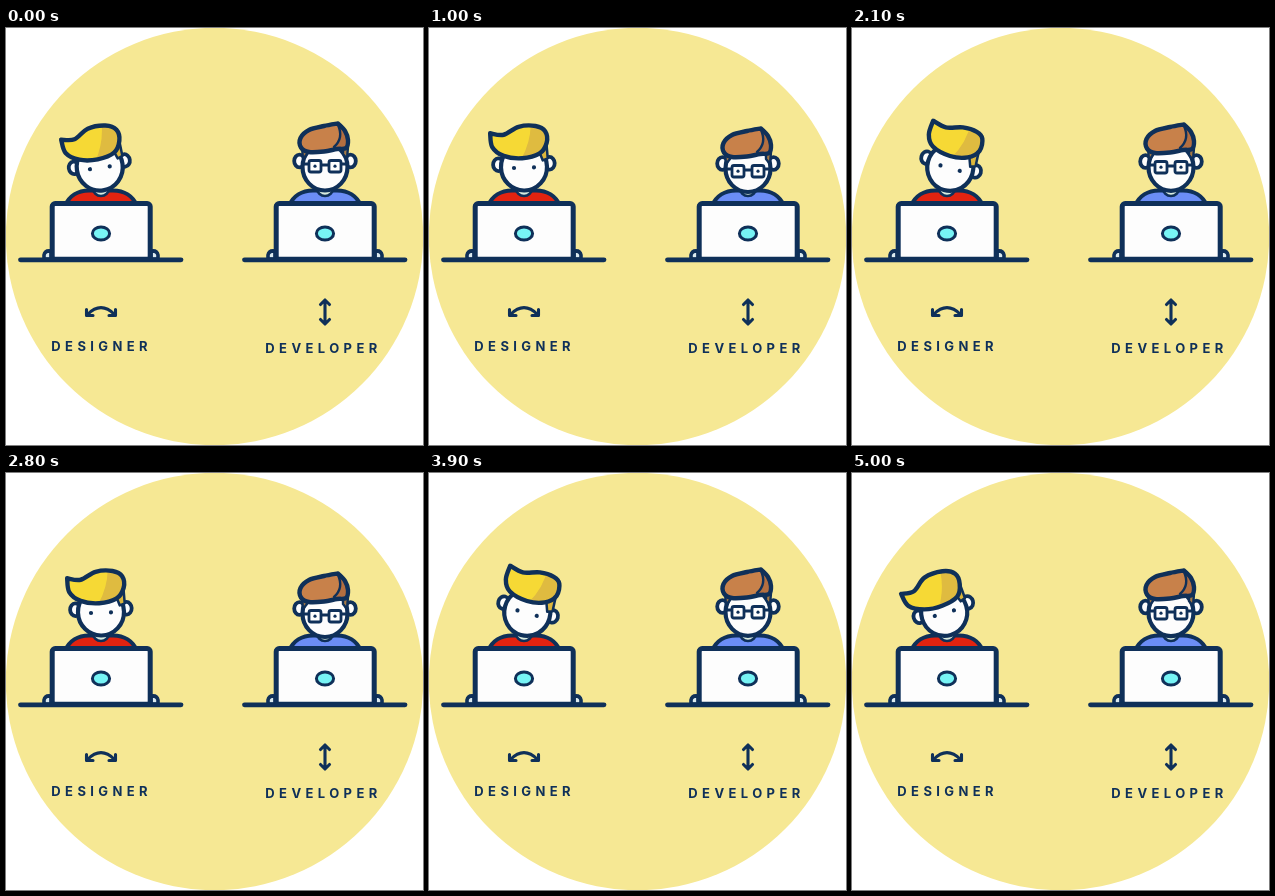
These frames come from a looping animation (417 by 417 pixels, 5.1 s). An HTML page with a canvas:

```html
<!DOCTYPE html>
<html lang="en">
<head>
<meta charset="utf-8">
<title>Designer and developer</title>
<style>
  html, body { margin: 0; width: 100%; height: 100%; overflow: hidden; background: #fff; }
  canvas { display: block; width: 417px; height: 417px; }
</style>
</head>
<body>
<canvas id="stage" width="417" height="417"></canvas>
<script>
const ctx = document.getElementById('stage').getContext('2d');
const NAVY = '#0f3059', WHITE = '#fdfdfd', SAND = '#f6e894';
const LOOP = 5100, STEP = 100;
const DESK_GAP = 224;

// Hair outlines in head space, leaning left and leaning right; both start at the tip.
const HAIR_LEFT = [[-36, -41], [-23, -40], [-9, -50], [10, -51], [21.5, -45], [23, -34],
  [17, -22.5], [0, -18], [-18, -19.5], [-32.5, -27.5]];
const HAIR_RIGHT = [[-29, -51.5], [-15, -48.5], [1.5, -53], [16, -52.5], [23, -47.5], [23.7, -35],
  [14, -25.5], [-3.5, -22], [-22.5, -26.5], [-29.5, -37]];
const QUIFF = [[332, 95.5], [318, 98], [303, 102], [294.5, 110], [295, 119.5], [303, 124],
  [318, 123.5], [331, 121], [340, 120], [342, 112], [339, 103]];
const NOD = [0, 1.5, 2, 1, 5, 7];

function paint(fill, width = 4) {
  if (fill) { ctx.fillStyle = fill; ctx.fill(); }
  if (width) { ctx.strokeStyle = NAVY; ctx.lineWidth = width; ctx.stroke(); }
}

function oval(x, y, rx, ry, fill, width) {
  ctx.beginPath();
  ctx.ellipse(x, y, rx, ry, 0, 0, Math.PI * 2);
  paint(fill, width);
}

function box(x, y, w, h, r, fill, width) {
  ctx.beginPath();
  ctx.roundRect(x, y, w, h, r);
  paint(fill, width);
}

function shape(path, fill, width) {
  const p = new Path2D(path);
  if (fill) { ctx.fillStyle = fill; ctx.fill(p); }
  if (width) { ctx.strokeStyle = NAVY; ctx.lineWidth = width; ctx.stroke(p); }
}

// Smooth loop through the points with a sharp corner at the first one.
function tuft(points) {
  const p = [points[0], ...points, points[0], points[0]];
  ctx.beginPath();
  ctx.moveTo(...p[0]);
  for (let i = 1; i < p.length - 2; i++) {
    const [a, b, c, d] = p.slice(i - 1, i + 3);
    ctx.bezierCurveTo(
      b[0] + (c[0] - a[0]) / 6, b[1] + (c[1] - a[1]) / 6,
      c[0] - (d[0] - b[0]) / 6, c[1] - (d[1] - b[1]) / 6, c[0], c[1]);
  }
  ctx.closePath();
}

function hair(points, color, shade, shadePath) {
  tuft(points);
  paint(color, 0);
  ctx.save();
  ctx.clip();
  shape(shadePath, shade);
  ctx.restore();
  tuft(points);
  paint(null, 4.4);
}

function body(color) {
  shape('M59 178C63 168 72 162.5 83 162.5H107C118 162.5 127 168 131 178Z', color, 4.2);
  oval(95, 160.5, 8, 7.5, '#d9ecdf', 2.6);
}

function laptop() {
  shape('M38 231V227Q39 222 45 223V231Z', '#dcebf0', 3.6);
  shape('M145 223Q151 222 152 227V231H145Z', '#dcebf0', 3.6);
  box(46.2, 175.6, 98, 55.6, 3, WHITE, 5);
  oval(95, 205.5, 8.6, 6.6, '#77f4f5', 3);
  shape('M14.5 231.8H175', null, 4.8);
}

function ears(x, y) {
  for (const side of [-1, 1]) oval(x + side * 25.5, y, 5.3, 6.3, WHITE, 3.8);
}

function designerHead(swing) {
  ctx.save();
  ctx.translate(95.3, 150);
  ctx.rotate(swing * 16.5 * Math.PI / 180);
  ears(0, -14);
  oval(0, -11, 23, 23.5, WHITE, 4.2);
  shape('M12 -33L23 -36L24 -19L19 -17L16 -25Z', '#dcb63c', 2.5);
  for (const x of [-10, 10]) oval(x, -10.3, 2.1, 2.1, NAVY, 0);
  const k = (swing + 1) / 2;
  const points = HAIR_LEFT.map((p, i) => p.map((v, j) => v + (HAIR_RIGHT[i][j] - v) * k));
  hair(points, '#f6d935', '#dfbb40', 'M8 -60Q9 -36 -5 -15H40V-60Z');
  ctx.restore();
}

function developerHead(nod) {
  ctx.save();
  ctx.translate(0, nod * 0.5);
  ears(319, 133);
  ctx.restore();
  ctx.save();
  ctx.translate(0, nod * 0.3);
  oval(319, 139, 22.5, 23.5, WHITE, 4.2);
  ctx.restore();
  ctx.save();
  ctx.translate(0, nod);
  shape('M296 119H301V126L297 131Z M342 119H337V126L341 131Z', '#a67a45', 2.4);
  shape('M297 136H303M315 137H323M335 136H341', null, 2.8);
  for (const x of [309, 329]) {
    box(x - 6, 132.5, 12, 11.5, 2, WHITE, 2.8);
    oval(x, 138.2, 1.6, 1.6, NAVY, 0);
  }
  hair(QUIFF, '#c8814a', '#b46f40', 'M331 90Q339 108 326 123V130H350V90Z');
  shape('M332 97Q338 110 328 119', null, 2.4);
  ctx.restore();
}

function label(text, x, y) {
  ctx.font = '700 13px Inter, sans-serif';
  ctx.letterSpacing = '4.4px';
  ctx.fillStyle = NAVY;
  ctx.fillText(text, x, y);
}

function captions() {
  shape('M81.5 286.5Q95 273 108.5 286.5M80.5 281.5V287.5H87M109.5 281.5V287.5H103', null, 3.1);
  shape('M319 272.5V295.5M314.5 276.5L319 272L323.5 276.5M314.5 291.5L319 296L323.5 291.5', null, 3.1);
  label('DESIGNER', 45.3, 323);
  label('DEVELOPER', 259.3, 325);
}

function ease(u) {
  u = Math.min(1, u);
  return u * u * u * (u * (6 * u - 15) + 10);
}

// Tips from side to side every 900 ms and rests at each end.
function swingAt(t) {
  const p = (t + 216) % 1800;
  return p < 900 ? 2 * ease(p / 600) - 1 : 1 - 2 * ease((p - 900) / 600);
}

function shifted(draw) {
  ctx.save();
  ctx.translate(DESK_GAP, 0);
  draw();
  ctx.restore();
}

function frame(now) {
  const t = Math.floor(now % LOOP / STEP) * STEP;
  ctx.fillStyle = '#fff';
  ctx.fillRect(0, 0, 417, 417);
  ctx.lineCap = ctx.lineJoin = 'round';
  oval(208.5, 208.5, 208.7, 208.7, SAND, 0);

  body('#e22310');
  designerHead(swingAt(t));
  laptop();

  shifted(() => body('#6b8df6'));
  developerHead(NOD[t / STEP % NOD.length]);
  shifted(laptop);

  captions();
  requestAnimationFrame(() => frame(performance.now() - start));
}

const start = performance.now();
frame(0);
</script>
</body>
</html>
```
